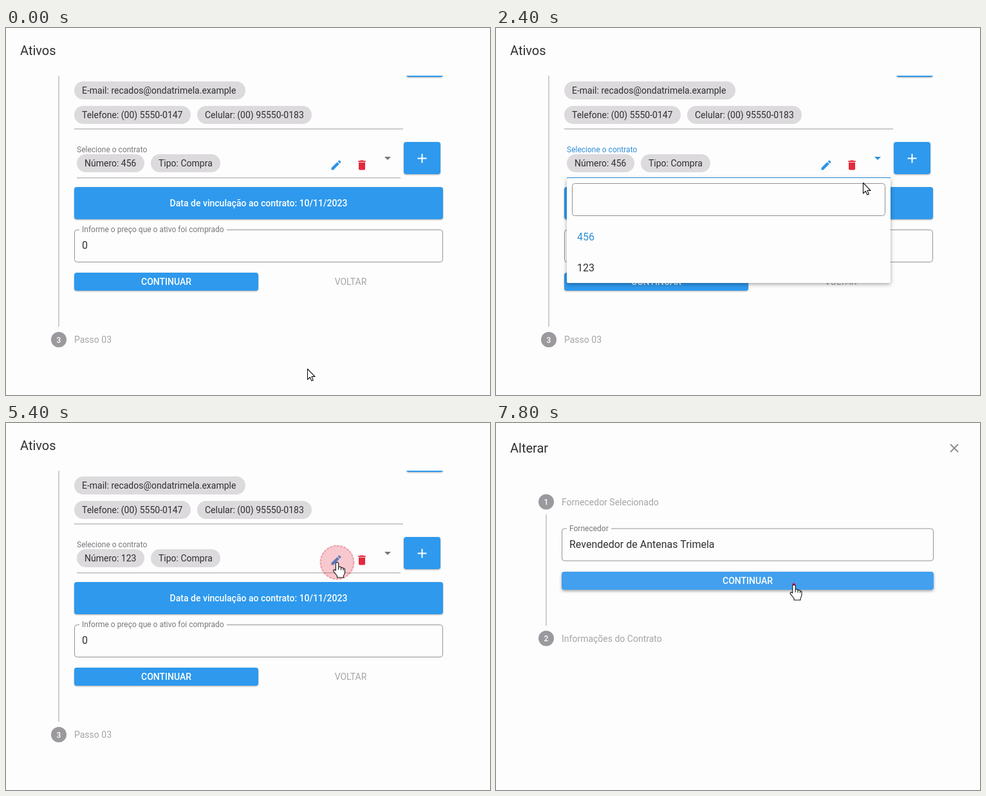
An HTML page that plays this animation: 752x570 px, repeating every 8000 ms.

```html
<!DOCTYPE html>
<html lang="pt-BR">
<head>
<meta charset="utf-8">
<title>Ativos</title>
<style>
  html, body { margin: 0; width: 100%; height: 100%; overflow: hidden; background: #fdfdfd; }
  svg { display: block; width: 100%; height: 100%; }
  text { font: 14px Roboto, sans-serif; fill: #2f2f31; }
  .title { font-size: 20px; }
  .value { font-size: 16px; }
  .label { font-size: 12px; fill: #77777a; }
  .muted { fill: #a5a5a8; }
  .caption { font-weight: 500; fill: #fff; text-anchor: middle; }
  .number { font-size: 12px; }
  .btn { fill: #2e99ed; filter: drop-shadow(0 1px 1px rgba(0,0,0,.32)); }
  .btn.hover { fill: #42a0ee; filter: drop-shadow(0 2px 2px rgba(0,0,0,.36)); }
  .chip { fill: #dcdadd; }
  .box { fill: none; stroke: #929295; }
  .rule { fill: #bdbdc0; }
  .rail { fill: #cfcfd3; }
  .focus .label, .focus .caret, .focus .rule { fill: #2e8fd8; }
  .caret { fill: #77777a; }
  .paper { fill: #fdfdfd; filter: drop-shadow(0 2px 3px rgba(0,0,0,.35)); }
  .cursor { fill: #fff; stroke: #111; stroke-width: 1.1; stroke-linejoin: round; }
</style>
</head>
<body>
<svg id="stage" viewBox="0 0 752 570"></svg>
<script>
const LOOP = 8000, STEP = 200;
const stage = document.getElementById('stage');

const rect = (x, y, w, h, cls, r = 0, extra = '') =>
  `<rect x="${x}" y="${y}" width="${w}" height="${h}" rx="${r}" class="${cls}" ${extra}/>`;
const text = (x, y, str, cls = '', id = '') => `<text x="${x}" y="${y}" class="${cls}" id="${id}">${str}</text>`;
const chip = (x, y, w, str, id) => rect(x, y, w, 28, 'chip', 14) + text(x + 12, y + 19, str, '', id);
const button = (x, y, w, h, str) =>
  rect(x, y, w, h, 'btn', 4) + text(x + w / 2, y + h / 2 + 5, str, 'caption');
const field = (x, y, w, labelWidth, label, value) =>
  rect(x + .5, y + .5, w - 1, 50, 'box', 4) +
  rect(x + 8, y - 1, labelWidth, 3, '', 0, 'fill="#fdfdfd"') +
  text(x + 12, y + 4, label, 'label') + text(x + 12, y + 30, value, 'value');
const step = (x, y, n, str) =>
  `<circle cx="${x}" cy="${y}" r="12" fill="#9b999d"/>` +
  text(x, y + 4.5, n, 'caption number') + text(x + 24, y + 5, str, 'muted');
const icon = (x, y, scale, fill, d) =>
  `<path transform="translate(${x} ${y}) scale(${scale})" ${fill} d="${d}"/>`;

stage.innerHTML = `
<defs>
  <clipPath id="scrollClip"><rect y="74" width="752" height="496"/></clipPath>
  <clipPath id="selectClip"><rect x="110" y="171" width="503" height="62"/></clipPath>
  <clipPath id="itemClip"><rect x="110" y="348" width="503" height="48"/></clipPath>
</defs>

<g id="assets">
  ${text(22, 42, 'Ativos', 'title')}
  ${rect(81, 74, 2, 390, 'rail')}
  <g clip-path="url(#scrollClip)">${rect(622, 26, 57, 50, 'btn', 4)}</g>
  ${chip(106, 83, 266, 'E-mail: recados@ondatrimela.example')}
  ${chip(106, 121, 181, 'Telefone: (00) 5550-0147')}
  ${chip(297, 121, 178, 'Celular: (00) 95550-0183')}
  ${rect(106, 156, 511, 1.5, 'rule')}
  <g clip-path="url(#selectClip)"><circle id="selectRipple" fill="#ebe9ec"/></g>
  <g id="select">
    ${text(110, 193, 'Selecione o contrato', 'label')}
    ${chip(110, 196, 105, '', 'contract')}
    ${chip(225, 196, 108, 'Tipo: Compra')}
    ${icon(503, 203, .8333, 'fill="#2e93e6"', 'M3 17.25V21h3.75L17.81 9.94l-3.75-3.75zM20.71 7.04c.39-.39.39-1.02 0-1.41l-2.34-2.34c-.39-.39-1.02-.39-1.41 0l-1.83 1.83 3.75 3.75z')}
    ${icon(543, 203, .8333, 'fill="#e22b3c"', 'M6 19c0 1.1.9 2 2 2h8c1.1 0 2-.9 2-2V7H6zM19 4h-3.5l-1-1h-5l-1 1H5v2h14z')}
    ${icon(581, 190, 1, 'class="caret"', 'M7 10l5 5 5-5z')}
    ${rect(110, 232, 503, 1.5, 'rule')}
  </g>
  ${rect(618, 177, 57, 50, 'btn', 4)}
  ${icon(634.5, 190.5, 1, 'fill="#fff"', 'M19 13h-6v6h-2v-6H5v-2h6V5h2v6h6z')}
  ${button(106, 247, 573, 50, 'Data de vinculação ao contrato: 10/11/2023')}
  ${field(106, 313, 573, 229, 'Informe o preço que o ativo foi comprado', '0')}
  ${button(106, 380, 286, 28, 'CONTINUAR')}
  <text x="535.5" y="399" class="muted" text-anchor="middle">VOLTAR</text>
  ${step(82, 484, 3, 'Passo 03')}
  <g id="menu">
    ${rect(110, 233, 503, 163, 'paper', 2)}
    ${rect(110, 232, 503, 1, '', 0, 'fill="#2e8fd8"')}
    ${rect(118.5, 241.5, 486, 50, 'box', 4)}
    ${rect(110, 300, 503, 48, '', 0, 'id="itemHover" fill="#ebebed"')}
    <g clip-path="url(#itemClip)"><circle id="itemRipple" fill="#d8d7da"/></g>
    <text x="126" y="330" class="value" style="fill:#2e8fd8">456</text>
    ${text(126, 378, '123', 'value')}
  </g>
</g>

<g id="dialog">
  ${text(22, 46, 'Alterar', 'title')}
  <path d="M706 33l12 12m0-12l-12 12" stroke="#8a8a8d" stroke-width="1.8"/>
  <path id="spinner" fill="none" stroke="#2e99ed" stroke-width="3.8"/>
  <g id="form">
    ${step(78, 122.5, 1, 'Fornecedor Selecionado')}
    ${rect(77, 142, 2, 173, 'rail')}
    ${field(102, 163.5, 578, 69, 'Fornecedor', 'Revendedor de Antenas Trimela')}
    ${button(102, 231, 578, 28, 'CONTINUAR')}
    ${step(78, 334.5, 2, 'Informações do Contrato')}
  </g>
</g>

<circle id="pulse" fill="#e0243c" stroke="#d81f38" stroke-width="2" stroke-dasharray="4 1.5"/>
<g id="pointer" class="cursor">
  <path id="arrow" d="M.5 .5V17L4.3 13.4L6.8 19L9.3 18L6.9 12.4H12Z"/>
  <path id="hand" d="M-2.2 13V2Q-2 .4 0 .4T2.2 2V7.5Q6 6.4 6 9Q9.4 8 9.5 10Q12 9.6 12 12V16Q11.6 19 10 21V24H0V21.5L-5.6 14.4Q-6.4 12.6 -5 12Q-4 11.6 -2.2 13ZM2.2 7.5V12M6 9V12.6M9.5 10V13"/>
</g>`;

const el = Object.fromEntries([...stage.querySelectorAll('[id]')].filter(e => e.id).map(e => [e.id, e]));
const buttons = [...stage.querySelectorAll('.btn')];
const show = (node, on) => node.style.display = on ? '' : 'none';
const set = (node, attrs) => { for (const k in attrs) node.setAttribute(k, attrs[k]); };

// Pointer path: time, x, y
const path = [
  [0, 468, 529], [400, 490, 490], [800, 574, 321], [1200, 596, 197],
  [2200, 596, 197], [2400, 570, 240], [2800, 390, 350], [3000, 345, 371],
  [4000, 345, 371], [4600, 490, 240], [4800, 514.5, 216],
  [6200, 514.5, 216], [6800, 367, 299], [7200, 367, 299], [7600, 440, 262], [7800, 463, 251], [8000, 463, 251]
];
const clicks = [1600, 3033, 4900, 7745];

function pointerAt(t) {
  const i = path.findIndex(p => p[0] > t);
  const [t0, x0, y0] = path[i - 1], [t1, x1, y1] = path[i];
  const k = (t - t0) / (t1 - t0);
  return [x0 + (x1 - x0) * k, y0 + (y1 - y0) * k];
}

const inside = (x, y, left, top, w, h) => x >= left && x <= left + w && y >= top && y <= top + h;
const insideNode = (x, y, node) =>
  inside(x, y, ...['x', 'y', 'width', 'height'].map(a => +node.getAttribute(a)));

function drawSpinner(t) {
  const turn = (t - 6200) / 1400;
  const from = 125 + 360 * turn;
  const sweep = 145 + 135 * Math.sin(.83 + 2 * Math.PI * turn);
  const point = deg => {
    const a = deg * Math.PI / 180;
    return `${373 + 18.2 * Math.cos(a)} ${307.5 + 18.2 * Math.sin(a)}`;
  };
  set(el.spinner, { d: `M${point(from)}A18.2 18.2 0 ${+(sweep > 180)} 1 ${point(from + sweep)}` });
}

function drawRipple(node, t, start, end, x, y, speed) {
  show(node, t > start && t < end);
  set(node, { cx: x, cy: y, r: Math.max(0, t - start) * speed });
}

function draw(t) {
  const [x, y] = pointerAt(t);
  const inDialog = t >= 5800, loaded = t >= 6600;
  const menuOpen = t >= 2000 && t < 3800;

  show(el.assets, !inDialog);
  show(el.dialog, inDialog);
  show(el.spinner, !loaded);
  show(el.form, loaded);
  drawSpinner(t);

  show(el.menu, menuOpen);
  el.menu.style.opacity = t === 2000 || t === 3600 ? .6 : 1;
  el.select.classList.toggle('focus', menuOpen);
  el.contract.textContent = 'Número: ' + (t >= 3600 ? 123 : 456);

  const onItem = menuOpen && inside(x, y, 110, 300, 503, 96);
  show(el.itemHover, onItem);
  set(el.itemHover, { y: y < 348 ? 300 : 348 });
  drawRipple(el.selectRipple, t, 1600, 2200, 596, 202, .185);
  drawRipple(el.itemRipple, t, 3033, 3800, 345, 372, .144);

  let clickable = onItem;
  for (const b of buttons) {
    const active = el.form.contains(b) ? loaded : !inDialog && !menuOpen;
    const hover = active && insideNode(x, y, b);
    b.classList.toggle('hover', hover);
    clickable ||= hover;
  }
  if (!inDialog && !menuOpen)
    clickable ||= inside(x, y, 110, 180, 503, 53) || inside(x, y, 393, 380, 286, 28);

  const age = Math.min(...clicks.map(c => t >= c ? t - c : Infinity));
  const r = age * .054;
  show(el.pulse, age <= 500);
  if (age <= 500)
    set(el.pulse, { cx: x, cy: y + .5, r: Math.max(1, r - 1), 'fill-opacity': 1 - .028 * r, 'stroke-opacity': Math.min(1, 1.1 - .028 * r) });

  set(el.pointer, { transform: `translate(${x} ${y})` });
  show(el.hand, clickable);
  show(el.arrow, !clickable);
}

function tick() {
  draw(Math.floor(performance.now() % LOOP / STEP) * STEP);
  requestAnimationFrame(tick);
}
tick();
</script>
</body>
</html>
```
